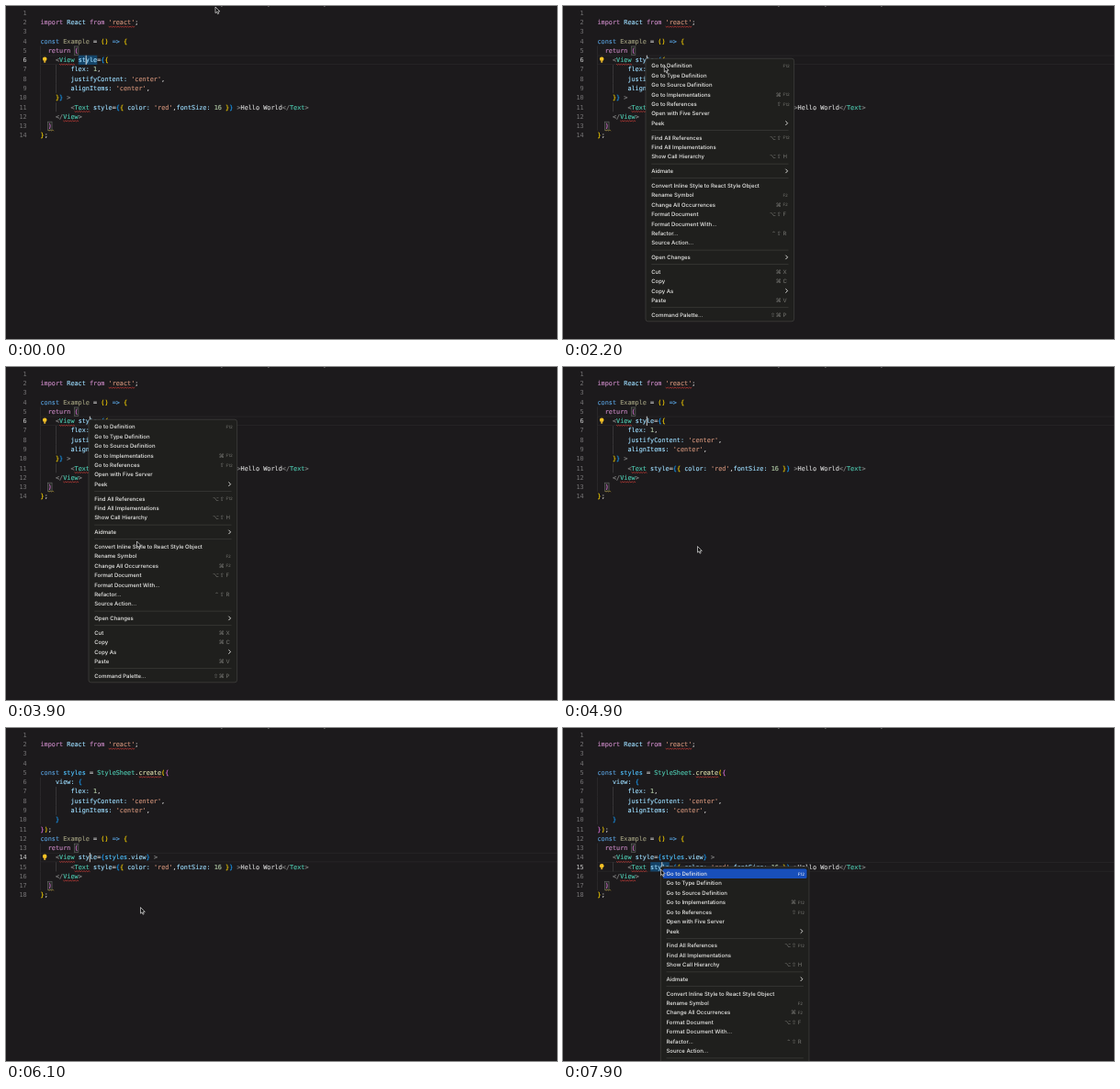
Recreate the animation shown at these times as an HTML page. Size 600 by 363 pixels, loop 8 s.

```html
<!DOCTYPE html>
<html lang="en">
<head>
<meta charset="utf-8">
<title>Editor context menu</title>
<style>
  html, body { margin: 0; width: 100%; height: 100%; overflow: hidden; background: #1c1a1c; }
  svg { display: block; width: 600px; height: 363px; }
  text { white-space: pre; text-rendering: geometricPrecision; }
  .code { font: 6.844px "DejaVu Sans Mono", monospace; }
  .code tspan { stroke-width: 0.14; }
  .menu { font: 500 6px Inter, sans-serif; }
  .hint { font-weight: 400; }
  .mods { font-family: "DejaVu Sans", sans-serif; }
</style>
</head>
<body>
<svg id="stage" viewBox="0 0 600 363"></svg>
<script>
const LOOP = 8000;
const CHAR = 4.12, LEFT = 37.5, PITCH = 10.27;
const ROW = 10.45, GAP = 5.2;
const HOVER_LAG = 200;

const COLORS = {
  p: '#c586c0', v: '#9cdcfe', s: '#ce9178', w: '#d4d4d4', k: '#569cd6',
  f: '#dcdcaa', d: '#9d9b7c', g: '#ffd700', o: '#da70d6', b: '#179fff',
  t: '#4ec9b0', n: '#b5cea8', x: '#808080', c: '#4fc1ff'
};

// Code runs are split by "~"; the first letter of a run is its colour key.
const IMPORT = "pimport ~vReact ~pfrom ~s'react'~w;";
const EXAMPLE = 'kconst ~dExample ~w= ~g() ~k=> ~g{';
const RETURN = 'w  ~preturn ~o(';
const RULES = [
  'w        ~vflex: ~n1~w,',
  "w        ~vjustifyContent: ~s'center'~w,",
  "w        ~valignItems: ~s'center'~w,"
];
const TAIL = [
  "w        ~x<~tText ~vstyle~w=~b{~g{ ~vcolor: ~s'red'~w,~vfontSize: ~n16 ~g}~b} ~x>~wHello World~x</~tText~x>",
  'w    ~x</~tView~x>',
  'w  ~o)',
  'g}~w;'
];
const INLINE = [
  '', IMPORT, '', EXAMPLE, RETURN, 'w    ~x<~tView ~vstyle~w=~b{~g{', ...RULES,
  'w    ~g}~b} ~x>', ...TAIL
];
const SHEET = [
  '', IMPORT, '', '', 'kconst ~cstyles ~w= ~tStyleSheet~w.~fcreate~g(~o{',
  'w    ~vview: ~b{', ...RULES, 'w    ~b}', 'o}~g)~w;', EXAMPLE, RETURN,
  'w    ~x<~tView ~vstyle~w=~b{~cstyles~w.~vview~b} ~x>', ...TAIL
];
const FLAGGED = /'react'|Text|View|create/;
const MATCHED = /\($|^  \)/;

// label, modifiers, key (">" opens a submenu); null is a separator
const ITEMS = [
  ['Go to Definition', '', 'F12'], ['Go to Type Definition'], ['Go to Source Definition'],
  ['Go to Implementations', '⌘', 'F12'], ['Go to References', '⇧', 'F12'],
  ['Open with Five Server'], ['Peek', '', '>'], null,
  ['Find All References', '⌥⇧', 'F12'], ['Find All Implementations'],
  ['Show Call Hierarchy', '⌥⇧', 'H'], null,
  ['Aidmate', '', '>'], null,
  ['Convert Inline Style to React Style Object'], ['Rename Symbol', '', 'F2'],
  ['Change All Occurrences', '⌘', 'F2'], ['Format Document', '⌥⇧', 'F'],
  ['Format Document With...'], ['Refactor...', '⌃⇧', 'R'], ['Source Action...'], null,
  ['Open Changes', '', '>'], null,
  ['Cut', '⌘', 'X'], ['Copy', '⌘', 'C'], ['Copy As', '', '>'], ['Paste', '⌘', 'V'], null,
  ['Command Palette...', '⇧⌘', 'P']
];

// The caret sits a few letters into the word "style" on the active line.
const STATES = [
  { at: 0, doc: 0, line: 6, into: 2, marked: true },
  { at: 1500, doc: 0, line: 6, into: 3, menu: true },
  { at: 4800, doc: 0, line: 6, into: 3 },
  { at: 5800, doc: 1, line: 14, into: 3 },
  { at: 7200, doc: 1, line: 15, into: 3, marked: true },
  { at: 7300, doc: 1, line: 15, into: 3, marked: true, menu: true }
];

const HOME = [228, 1];
const MOVES = [
  { from: 100, to: 1200, goal: [93.5, 60] },
  { from: 1250, to: 1500, goal: [90, 57.2] },
  { from: 1900, to: 3900, goal: [142.5, 190] },
  { from: 3950, to: 4500, goal: [146.5, 195.5] },
  { from: 6300, to: 7000, goal: [107.5, 154] },
  { from: 7050, to: 7300, goal: [106.3, 151] },
  { from: 7350, to: 7600, goal: [106.5, 154] }
];

const stage = document.getElementById('stage');

function add(parent, tag, attrs, text) {
  const el = document.createElementNS('http://www.w3.org/2000/svg', tag);
  for (const key in attrs) el.setAttribute(key, attrs[key]);
  if (text !== undefined) el.textContent = text;
  return parent.appendChild(el);
}
const rect = (parent, x, y, width, height, fill, more) =>
  add(parent, 'rect', { x, y, width, height, fill, ...more });
const show = (el, on) => el.setAttribute('visibility', on ? 'inherit' : 'hidden');
const move = (el, x, y) => el.setAttribute('transform', `translate(${x} ${y})`);
const colX = col => LEFT + col * CHAR;
const lineY = line => 2.4 + (line - 1) * PITCH;
const plain = line => line.split('~').map(run => run.slice(1)).join('');

function squiggle(parent, top, col, len, color) {
  const x = colX(col), y = top + 9.5, steps = Math.round(len * CHAR / 1.3);
  let d = `M${x} ${y}`;
  for (let i = 1; i <= steps; i++) d += `L${x + i * 1.3} ${y + (i % 2)}`;
  add(parent, 'path', { d, fill: 'none', stroke: color, 'stroke-width': 0.65 });
}

function buildDoc(lines) {
  const g = add(stage, 'g', { class: 'code' });
  const numbers = lines.map((line, i) => {
    const top = lineY(i + 1), y = top + 7.4, code = plain(line);
    for (let col = 0; col < code.search(/\S/); col += 4)
      rect(g, colX(col), top, 0.5, PITCH, col ? '#555355' : '#363436');

    const bracket = code.search(MATCHED);
    if (bracket >= 0) {
      const col = code.length - 1;
      rect(g, colX(col) - 0.1, top + 0.5, CHAR + 0.3, PITCH - 1, '#242824',
        { stroke: '#777', 'stroke-width': 0.5 });
      if (code[col] === ')') squiggle(g, top, col, 1.6, '#a58a2a');
    }

    const text = add(g, 'text', { x: LEFT, y });
    for (const run of line.split('~')) {
      const color = COLORS[run[0]];
      if (run) add(text, 'tspan', { fill: color, stroke: color }, run.slice(1));
    }
    const flagged = code.match(FLAGGED);
    if (flagged) squiggle(g, top, flagged.index, flagged[0].length, '#e0403a');
    return add(g, 'text', { x: 22.7, y, 'text-anchor': 'end' }, i + 1);
  });
  return { g, numbers, words: lines.map(line => plain(line).indexOf('style')) };
}

function buildMenu() {
  const g = add(stage, 'g', { class: 'menu' });
  rect(g, 0, 0, 161.6, 286.6, '#1f1f1d', { rx: 2.6, stroke: '#4a4a47', 'stroke-width': 0.6 });
  const bar = rect(g, 2.4, 0, 156.8, ROW, '#184fba', { rx: 1.6 });
  const rows = [];
  let y = 7.8;
  for (const item of ITEMS) {
    if (!item) {
      rect(g, 6.2, y - 2.9, 149.4, 0.6, '#42423f');
      y += GAP;
      continue;
    }
    const [label, mods, key] = item;
    add(g, 'text', { x: 6.2, y: y + 2.2, fill: '#ececea' }, label);
    const hint = add(g, 'g', { class: 'hint' });
    if (mods) add(hint, 'text', {
      x: 148.4, y: y + 2.2, class: 'mods', 'text-anchor': 'end', 'letter-spacing': 0.7
    }, mods);
    if (key === '>')
      add(g, 'path', { d: `M152.4 ${y - 2.2}l2.2 2.2l-2.2 2.2`, fill: 'none', stroke: '#ececea', 'stroke-width': 0.9 });
    else if (key)
      add(hint, 'text', { x: 149.4, y: y + 2, 'font-size': key.length > 1 ? 4.5 : 6 }, key);
    rows.push({ y, hint });
    y += ROW;
  }
  return { g, bar, rows };
}

// slivers of the path text above the editor
for (const x of [234, 285, 346]) rect(stage, x, 0, 1.6, 0.7, '#777');

const frame = add(stage, 'g', {});
for (const y of [0, PITCH - 0.6]) rect(frame, LEFT, y, 563, 0.6, '#2c2a2c');
const word = rect(stage, 0, 0, CHAR * 5, PITCH, '#154468');
const docs = [INLINE, SHEET].map(buildDoc);
const caret = rect(stage, 0, 0, 0.9, PITCH, '#d8d8d8');
const bulb = add(stage, 'g', {});
add(bulb, 'circle', { cx: 42.2, cy: 4, r: 2.3, fill: '#f7c325' });
rect(bulb, 41.2, 5.8, 2, 2.2, '#d3a52a');
const menu = buildMenu();
const pointer = add(stage, 'path', {
  d: 'M0 0V6.7L1.5 5.3L2.5 7.7L3.7 7.2L2.7 4.9H4.8Z',
  fill: '#111', stroke: '#eee', 'stroke-width': 0.65, 'stroke-linejoin': 'round'
});

// The hand swings sideways early and eases vertically.
function pointerAt(t) {
  let [x, y] = HOME;
  for (const { from, to, goal } of MOVES) {
    const k = Math.min(1, Math.max(0, (t - from) / (to - from)));
    x += (goal[0] - x) * (1 - (1 - k) ** 3);
    y += (goal[1] - y) * k * k * (3 - 2 * k);
  }
  return [x, y];
}

function renderMenu(t, opened) {
  const [x, y] = pointerAt(opened);
  move(menu.g, x, y);
  const hover = pointerAt(Math.max(opened, t - HOVER_LAG))[1] - y;
  const hit = menu.rows.find(row => Math.abs(row.y - hover) <= ROW / 2);
  show(menu.bar, hit);
  if (hit) menu.bar.setAttribute('y', hit.y - ROW / 2);
  for (const row of menu.rows) row.hint.setAttribute('fill', row === hit ? '#fff' : '#7a7a76');
}

function render(t) {
  const state = STATES.filter(s => s.at <= t).pop();
  const { numbers, words } = docs[state.doc];
  const top = lineY(state.line), col = words[state.line - 1];

  docs.forEach((doc, i) => show(doc.g, i === state.doc));
  numbers.forEach((n, i) => n.setAttribute('fill', i + 1 === state.line ? '#d0d0d0' : '#777577'));
  move(frame, 0, top);
  move(bulb, 0, top);
  move(word, colX(col), top);
  show(word, state.marked);
  move(caret, colX(col + state.into) - 0.2, top);
  show(caret, state.menu || (t - state.at) % 1000 < 500);
  show(menu.g, state.menu);
  if (state.menu) renderMenu(t, state.at);
  move(pointer, ...pointerAt(t));
}

const start = performance.now();
function tick() {
  render((performance.now() - start) % LOOP);
  requestAnimationFrame(tick);
}
tick();
</script>
</body>
</html>
```
